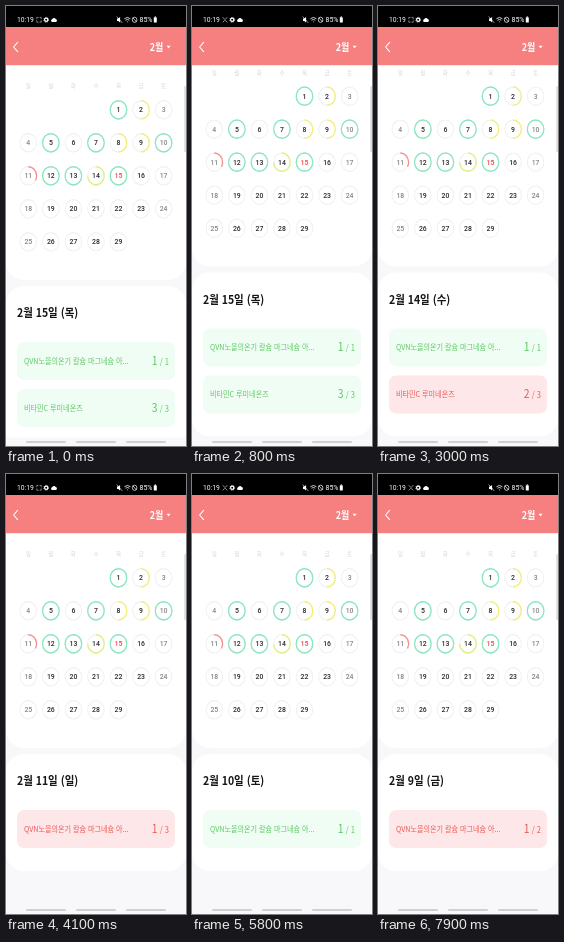
An HTML page that plays this animation: 180 by 440 pixels, repeating every 8000 ms.

```html
<!DOCTYPE html>
<html lang="ko">
<head>
<meta charset="utf-8">
<style>
html, body { margin: 0; width: 100%; height: 100%; overflow: hidden; background: #f8f7f9; }
svg { display: block; width: 180px; height: 440px; }
text { font-family: "Noto Sans CJK KR", "Noto Sans CJK", sans-serif; white-space: pre; }
.num { font-family: Roboto, sans-serif; }
</style>
</head>
<body>
<svg id="stage" viewBox="0 0 180 440"></svg>
<script>
const LOOP = 8000, TALL = 1.1, MAX_SCROLL = 13.6;
const stage = document.getElementById('stage');

function add(parent, tag, attrs = {}, text) {
  const el = document.createElementNS('http://www.w3.org/2000/svg', tag);
  for (const k in attrs) el.setAttribute(k, attrs[k]);
  if (text !== undefined) el.textContent = text;
  parent.appendChild(el);
  return el;
}
// The phone's picture is slightly taller than wide
const at = (x, y) => `translate(${x} ${y}) scale(1 ${TALL})`;
const rect = (p, x, y, width, height, fill, rx = 0) => add(p, 'rect', { x, y, width, height, fill, rx });
const label = (p, x, y, size, fill, text, more = {}) =>
  add(p, 'text', { transform: at(x, y), 'font-size': size, fill, ...more }, text);
const line = (p, d, stroke, width = 1) =>
  add(p, 'path', { d, stroke, 'stroke-width': width, fill: 'none', 'stroke-linecap': 'round', 'stroke-linejoin': 'round' });

const page = add(stage, 'g');

// Calendar
rect(page, 0, 20, 180, 254, '#fff', 18);
const colX = i => 22.3 + 22.55 * i;
const share = { 1: 1, 2: .5, 5: 1, 7: 1, 8: .5, 9: .5, 10: 1, 11: 1 / 3, 12: 1, 13: 1, 14: .75, 15: 1 };
const ringColor = s => s === 1 ? '#8be7c0' : s > .5 ? '#dff084' : s === .5 ? '#f2ef7c' : '#f58f8f';

[...'일월화수목금토'].forEach((d, i) =>
  label(page, colX(i), 82.2, 5.6, '#d6d6d8', d, { 'text-anchor': 'middle' }));

function day(n) {
  const cell = n + 3, col = cell % 7;
  const x = colX(col), y = 103.8 + 33 * Math.floor(cell / 7);
  const today = n === 15, weekend = col === 0 || col === 6;
  const g = add(page, 'g', { transform: at(x, y) });
  const ring = { r: 8.3, fill: 'none' };
  add(g, 'circle', { ...ring, stroke: '#f0f0f1', 'stroke-width': 1 });
  const s = share[n];
  if (s) add(g, 'circle', {
    ...ring, stroke: ringColor(s), 'stroke-width': 1.3,
    pathLength: 100, 'stroke-dasharray': s === 1 ? 'none' : `${s * 100} 100`, transform: 'rotate(-90)'
  });
  add(g, 'text', {
    class: 'num', y: 2.4, 'text-anchor': 'middle', 'font-size': 6.9,
    'font-weight': today ? 700 : 500, fill: today ? '#f2605f' : weekend ? '#858587' : '#2a2a2a'
  }, n);
}
for (let n = 1; n <= 29; n++) day(n);

// Daily list
const sheet = rect(page, 0, 280, 180, 164, '#fff', 18);
const title = label(page, 11, 311.2, 10.5, '#161616', '', { 'font-weight': 700 });

function makeItem(y, name) {
  const g = add(page, 'g');
  const box = rect(g, 11, y, 158, 38, '#fff', 7);
  const text = label(g, 18, y + 22, 7.1, '#000', name, { 'font-weight': 500 });
  const count = label(g, 163, y + 22.6, 7.6, '#000', '', { 'text-anchor': 'end' });
  const done = add(count, 'tspan', { 'font-size': 10.4, 'font-weight': 500 });
  const goal = add(count, 'tspan');
  return (a, b) => {
    g.setAttribute('display', b ? 'inline' : 'none');
    const full = a === b, ink = full ? '#5cc962' : '#ec5a58';
    box.setAttribute('fill', full ? '#f0fdf4' : '#fde7e9');
    text.setAttribute('fill', ink);
    count.setAttribute('fill', ink);
    done.textContent = a;
    goal.textContent = ' / ' + b;
  };
}
const items = [makeItem(336, 'QVN노을의온기 칼슘 마그네슘 아...'), makeItem(383, '비타민C 루미네온즈')];

// Touch marker
const finger = add(stage, 'ellipse', { rx: 5.2, ry: 5.8, fill: '#fff', 'fill-opacity': .35, stroke: '#dedee1', 'stroke-width': 1 });

// Top bars
rect(stage, 0, 21, 180, 38.2, '#f67f80');
line(stage, 'M11.6 36.3L7.6 41L11.6 45.7', '#fff', 1.1);
label(stage, 143.7, 44.7, 9, '#fff', '2월', { 'font-weight': 700 });
add(stage, 'path', { d: 'M160.6 39.8h4l-2 2.7z', fill: '#fff' });

rect(stage, 0, 0, 180, 21, '#000');
label(stage, 11, 16.2, 6.8, '#fff', '10:19', { class: 'num' });
const corners = line(stage, 'M30.8 12.8v-1.4h1.3M33.9 11.4h1.3v1.4M35.2 14.8v1.4h-1.3M32.1 16.2h-1.3v-1.4', '#b5b5b5', .7);
const cross = line(stage, 'M31 11.5l1.4 1.5M35 11.5l-1.4 1.5M31 16.1l1.4-1.5M35 16.1l-1.4-1.5M33 13.8h.01', '#d0d0d0', .7);
add(stage, 'circle', { cx: 40.2, cy: 13.8, r: 1.6, fill: 'none', stroke: '#fff', 'stroke-width': 1.2 });
add(stage, 'circle', { cx: 40.2, cy: 13.8, r: 2.4, fill: 'none', stroke: '#fff', 'stroke-width': .8, 'stroke-dasharray': '1 .88' });
add(stage, 'path', { d: 'M46 16a1.5 1.5 0 0 1 .1-2.8a2 2 0 0 1 3.6-.3a1.6 1.6 0 0 1 .1 3.1z', fill: '#fff' });
add(stage, 'path', { d: 'M111 12.6h1.3l1.8-1.6v5.6l-1.8-1.5H111z', fill: '#fff' });
line(stage, 'M111 10.8l5 5.8', '#fff', .6);
line(stage, 'M118.7 12.5q2.7-2.4 5.4 0M119.8 14q1.6-1.4 3.2 0M121.4 15.8h.01', '#fff', .8);
add(stage, 'ellipse', { cx: 128.6, cy: 13.8, rx: 2.3, ry: 2.6, fill: 'none', stroke: '#fff', 'stroke-width': .7 });
line(stage, 'M127 12l3.2 3.6', '#fff', .7);
label(stage, 133.5, 16.3, 7, '#fff', '85%', { class: 'num' });
rect(stage, 147.8, 11.2, 3, 5.4, '#fff', .6);
rect(stage, 148.7, 10.4, 1.2, 1, '#fff');

// Edge handle and navigation bar
rect(stage, 178.2, 80, 2.6, 66, '#dcdcde', 1);
rect(stage, 0, 431.5, 180, 9, '#f8f7f9');
[20, 70, 120].forEach(x => rect(stage, x, 435.2, 40, 1.6, '#c4c4c6', .8));

// [start, heading, counts of each item]
const views = [
  [0, '2월 15일 (목)', [[1, 1], [3, 3]]],
  [2200, '2월 14일 (수)', [[1, 1], [2, 3]]],
  [3900, '2월 11일 (일)', [[1, 3]]],
  [5500, '2월 10일 (토)', [[1, 1]]],
  [7300, '2월 9일 (금)', [[1, 2]]]
];
// [start, end, x, y]
const taps = [[1850, 2050, 90.5, 158], [3400, 3550, 25, 166], [5020, 5170, 157, 139], [6980, 7120, 136, 139]];

const clamp = v => Math.max(0, Math.min(1, v));
const easeOut = v => 1 - (1 - v) ** 2;
let shown;

function show(view) {
  if (view === shown) return;
  shown = view;
  title.textContent = view[1];
  items.forEach((set, i) => set(...(view[2][i] || [0, 0])));
  sheet.setAttribute('height', 117 + 47 * (view[2].length - 1));
}

function render(t) {
  const view = views.filter(v => t >= v[0]).pop();
  show(view);

  const drag = easeOut(clamp((t - 50) / 300));
  const scroll = view[2].length > 1 ? MAX_SCROLL * drag : 0;
  page.setAttribute('transform', `translate(0 ${-scroll})`);

  const tap = taps.find(p => t >= p[0] && t < p[1]);
  const dragging = t >= 50 && t < 480;
  finger.setAttribute('display', tap || dragging ? 'inline' : 'none');
  finger.setAttribute('cx', tap ? tap[2] : 145);
  finger.setAttribute('cy', tap ? tap[3] : 247 + 17 * (1 - drag));

  const blink = t % 1000 >= 500;
  corners.setAttribute('display', blink ? 'none' : 'inline');
  cross.setAttribute('display', blink ? 'inline' : 'none');
}

const start = performance.now();
function tick() {
  render((performance.now() - start) % LOOP);
  requestAnimationFrame(tick);
}
tick();
</script>
</body>
</html>
```
